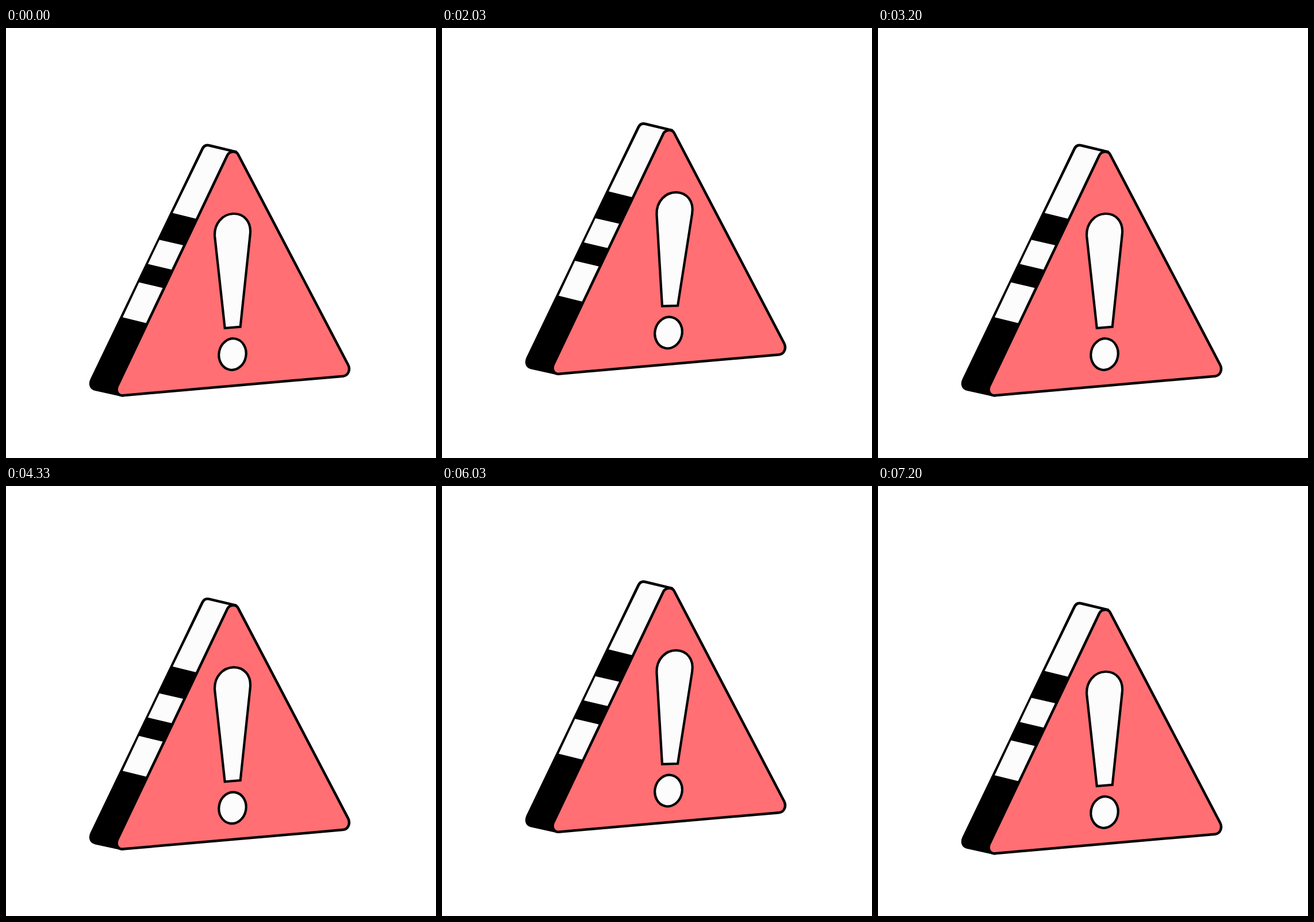
An HTML page for the animation above (8010 ms loop, 748 by 748 pixels).

```html
<!DOCTYPE html>
<html lang="en">
<head>
<meta charset="utf-8">
<title>Warning sign</title>
<style>
  html, body { margin: 0; height: 100%; overflow: hidden; background: #fff; }
  svg { display: block; width: 100vw; height: 100vh; }
</style>
</head>
<body>
<svg viewBox="0 0 748 748">
  <g id="sign" stroke="#000" stroke-width="4.5" stroke-linejoin="round">
    <!-- side -->
    <path d="M400 215.4L353.5 204.2C347.5 202.8 344 205.2 341.6 210L148.8 611.5C145.2 619.5 147.4 626.5 154.5 628.6L203 639.2Z"/>
    <g fill="#fcfcfc" stroke="none">
      <path d="M290 321.7L343.9 211Q346.5 205.4 352.5 206.4L388.5 215L331.5 332Z"/>
      <path d="M267 368.5L308.5 378L289 420.5L247 410.5Z"/>
      <path d="M231.5 442.5L273 452.3L244.5 513.5L203 503.2Z"/>
    </g>
    <!-- face -->
    <path fill="#ff6f73" d="M385.2 221C389.3 213.8 400.3 213.2 403.8 220L595.2 586C599.2 594 596 604.8 586 605.7L203 639.2C195 639.8 190.3 632 193.8 623Z"/>
    <g id="mark" fill="#fcfcfc" stroke-width="4.2">
      <path stroke-linejoin="miter" d="M380.7 522L363.2 363C361.4 340 377 323.5 395.8 323C414 322.7 427 337 424.8 358.5L407.7 519.8Z"/>
      <ellipse cx="394" cy="567.5" rx="23.6" ry="27.4" transform="rotate(10 394 567.5)"/>
    </g>
  </g>
</svg>
<script>
const LOOP = 8010, CYCLE = 4000, LIFT = 37.5, TILT = 2.9;
const sign = document.getElementById('sign');
const mark = document.getElementById('mark');
const clamp = x => Math.min(1, Math.max(0, x));

// cubic-bezier(.5, 0, .5, 1), solved by bisection
function ease(x) {
  let lo = 0, hi = 1, s;
  for (let i = 0; i < 20; i++) {
    s = (lo + hi) / 2;
    if (1.5 * s * (1 - s) + s ** 3 < x) lo = s; else hi = s;
  }
  return s * s * (3 - 2 * s);
}

// Poses change twice per 100 ms
function step(ms) {
  const rest = ms % 100;
  return ms - rest + (rest >= 30 ? 100 / 3 : 0);
}

function draw(now) {
  const t = step(now % LOOP % CYCLE);
  const lift = LIFT * (ease(clamp(t / 1000)) - ease(clamp((t - 2200) / 1000)));
  const shake = clamp((t - 1000) / 1200);
  const tilt = -TILT * Math.sin(shake * 4 * Math.PI);
  sign.setAttribute('transform', `translate(0 ${-lift})`);
  mark.setAttribute('transform', `rotate(${tilt} 394 567.5)`);
}

const start = performance.now();
function tick() {
  draw(performance.now() - start);
  requestAnimationFrame(tick);
}
tick();
</script>
</body>
</html>
```
